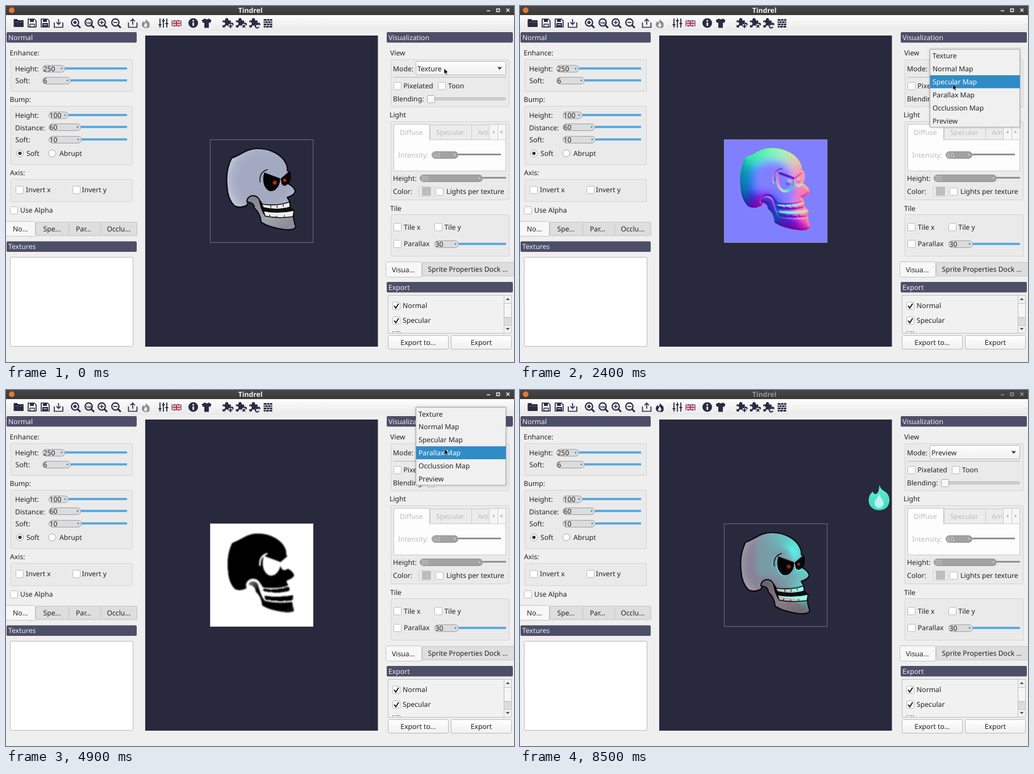
An HTML page with a canvas for the animation above (9000 ms loop, 894x627 px).

```html
<!DOCTYPE html>
<html lang="en">
<head>
<meta charset="utf-8">
<title>Map viewer</title>
<style>
  html, body { margin: 0; width: 894px; height: 627px; overflow: hidden; background: #efefef; }
  svg, canvas { position: absolute; left: 0; top: 0; display: block; }
  canvas { left: 359px; top: 235px; }
  text { font: 12.2px 'Noto Sans', sans-serif; text-rendering: geometricPrecision; white-space: pre; }
  .bold { font-weight: 700; }
</style>
</head>
<body>
<svg id="ui" width="894" height="627" viewBox="0 0 894 627"></svg>
<canvas id="sprite" width="182" height="182"></canvas>
<script>
const INK = '#2a2a44', TEXT = '#222', OFF = '#bcbcbc', BLUE = '#5aaae0';
const MODES = ['Texture', 'Normal Map', 'Specular Map', 'Parallax Map', 'Occlussion Map', 'Preview'];
const ROW = 22.85;

// ---- markup helpers ----
const rect = (x, y, w, h, fill, stroke = 'none', r = 0) =>
  `<rect x="${x + .5}" y="${y + .5}" width="${w - 1}" height="${h - 1}" rx="${r}" fill="${fill}" stroke="${stroke}"/>`;
const fillRect = (x, y, w, h, fill, r = 0) => `<rect x="${x}" y="${y}" width="${w}" height="${h}" rx="${r}" fill="${fill}"/>`;
const text = (x, mid, s, fill = TEXT, extra = '') => `<text x="${x}" y="${mid + 4.2}" fill="${fill}" ${extra}>${s}</text>`;
const path = (d, fill, stroke = 'none', w = 1, extra = '') =>
  `<path d="${d}" fill="${fill}" stroke="${stroke}" stroke-width="${w}" ${extra}/>`;
const dot = (x, y, r, fill, stroke = 'none') => `<circle cx="${x}" cy="${y}" r="${r}" fill="${fill}" stroke="${stroke}"/>`;
const at = (x, y, s, extra = '') => `<g transform="translate(${x} ${y}) ${extra}">${s}</g>`;

const header = (x, y, w, s) => fillRect(x, y, w, 18.4, '#4d4e68', 2) + text(x + 3, y + 9.5, s, '#f0f0f0');
const group = (x, y, w, h) => rect(x, y, w, h, '#eaeaea', '#d3d3d3', 1);
const check = (x, y, on) => rect(x, y, 14, 14, '#fff', '#b9b9b9', 1) +
  (on ? path(`M${x + 3} ${y + 7}l3 4 5-8`, 'none', '#1c1c1c', 2) : '');
const option = (x, mid, tx, s, on) => check(x, mid - 7, on) + text(tx, mid, s);
const radio = (x, y, on) => dot(x, y, 6.2, '#fff', '#a5a5a5') + (on ? dot(x, y, 3, '#333') : '');
const slider = (x, y, end, stop, value, live = true) =>
  fillRect(end, y - 2, stop - end, live ? 4 : 3, live ? BLUE : '#909090') +
  rect(x, y - 6, end - x, 13, live ? '#dcdcdc' : '#a2a2a2', live ? '#9c9c9c' : '#8f8f8f', 6) +
  text(x + 1.5, y + 1, value, live ? TEXT : '#c6c6c6') + dot(end - 6, y, 1.5, live ? '#3a8fd0' : '#d0d0d0');
const tab = (x, y, w, h, tx, mid, s, on) =>
  rect(x, y, w, h, on ? '#f7f7f7' : '#dedede', '#c4c4c4', 1) + text(tx, mid, s);
const button = (x, y, w, h, s) => rect(x, y, w, h, 'url(#raised)', '#b8b8b8', 2) +
  text(x + w / 2, y + h / 2, s, TEXT, 'text-anchor="middle"');

// ---- icons ----
const floppy = full => path('M1 1h11l3 3v11H1z', 'none', INK, 1.7) + path('M4 1h7v5H4z', INK) +
  (full ? path('M3 8h10v7H3z', INK) + path('M5 11h6', 'none', '#eee', 1.2) : path('M4 10h8v5H4z', 'none', INK, 1.3));
const lens = mark => path('M4.5 4.5L9.5 9.5', 'none', INK, 3) + `<circle r="6.3" fill="#f4f4f4" stroke="${INK}" stroke-width="2.2"/>` + mark;
const tray = arrow => path('M1 7v8.5h15V7', 'none', INK, 1.7) + path(arrow, 'none', INK, 1.7);
const puzzle = (x, mark) => at(x, 30, path('M-7-4h4a2.7 2.7 0 1 1 5 0h4v4a2.6 2.6 0 1 1 0 4v3h-4a2.6 2.6 0 1 0-5 0h-4v-4a2.5 2.5 0 1 0 0-4z', INK) +
  dot(5.5, 5, 3.6, '#eee') + path(mark, 'none', INK, 1.8), 'scale(1.12)');
const FLAME = 'M633 167C633 174 640 177 645 181C653 189 651 203 644 208C637 213 627 213 620 208C612 202 612 190 617 183C618 181 620 180 621 179C622 182 624 184 627 183C633 179 631 173 633 167Z';
const DROP = 'M632 183C635 191 640 194 640 200A8 8 0 0 1 624 200C624 194 629 191 632 183Z';

const toolbar = () => [
  path('M13.500 24q0-1 1-1h5l2 2h8.500q1 0 1 1v10q0 1-1 1H14.500q-1 0-1-1z', INK) + path('M16 28.500h15', 'none', '#6d6d80', .7),
  at(38, 22, floppy(false)), at(61, 22, floppy(true)),
  at(84, 22, tray('M8.5 1v9M4.5 6.5l4 4 4-4')),
  at(121.5, 29, lens(path('M-3 0h6M0-3v6', 'none', INK, 2.6))),
  at(145.5, 29, lens(`<text x="-5" y="2.6" fill="${INK}" style="font-size:6px;font-weight:700">100</text>`)),
  at(168.5, 29, lens(path('M-3.5 0h7M0-3.5v7', 'none', INK, 1.7))),
  at(192.5, 29, lens(path('M-3.5 0h7', 'none', INK, 1.7))),
  at(214.5, 22, tray('M8.5 11V1M4.5 5l4-4 4 4')),
  `<g id="lamp">${path(FLAME, 'currentColor', 'none', 1, 'transform="translate(9 -37.5) scale(.375 .36)"')}` +
    `${path(DROP, '#eee', 'none', 1, 'transform="translate(9 -37.5) scale(.375 .36)"')}` +
    `${path('M247 36h6M250 33v6', 'none', 'currentColor', 1.6)}</g>`,
  path('M271 22v16M277 22v16M283 22v16M268.500 33h5M274.500 26h5M280.500 31h5', 'none', INK, 1.8),
  fillRect(291, 25, 18, 11, '#2b3c80') + path('M291 25l18 11M309 25l-18 11', 'none', '#fff', 2.4) +
    path('M291 25l18 11M309 25l-18 11', 'none', '#c8213a', .9) + path('M300 25v11M291 30.500h18', 'none', '#fff', 4) +
    path('M300 25v11M291 30.500h18', 'none', '#c8213a', 2.2),
  dot(329.5, 30, 8.5, INK) + fillRect(328.3, 29, 2.6, 6, '#fff') + dot(329.6, 26, 1.6, '#fff'),
  path('M350 22q3.500 3 7 0l4.500 3-2 5-2.500-1v9.500h-8V29l-2.500 1-2-5z', INK),
  puzzle(389, 'M2.5 5h6M5.5 2v6'), puzzle(412.5, 'M3.5 3l4 4M7.5 3l-4 4'), puzzle(436, 'M7.5 3a2.8 2.8 0 1 0 .5 3'),
  fillRect(453.5, 23, 15, 15, INK) + path('M453 26.500h16M453 30.500h16M453 34.500h16M459 23v3M464 23v3M456 27v3M461 27v3M466 27v3M459 31v3M464 31v3M457 35v3M463 35v3', 'none', '#eee', 1),
  ...[8, 262, 316, 380].map(x => path(`M${x} 23v14`, 'none', '#d4d4d4', 1, 'stroke-dasharray="1 2"'))
].join('');

const leftPanel = () => [
  header(1, 46, 229, 'Normal'),
  text(6.5, 83, 'Enhance:'), group(8, 94, 215, 57),
  text(16, 111, 'Height:'), slider(64, 110, 104, 213, '250'),
  text(16.5, 132, 'Soft:'), slider(64, 131, 114, 213, '6'),
  text(6.5, 165, 'Bump:'), group(8, 176, 215, 104),
  text(16, 193, 'Height:'), slider(75, 192, 110, 213, '100'),
  text(16, 214.5, 'Distance:'), slider(75, 213, 132, 213, '60'),
  text(16.5, 236, 'Soft:'), slider(75, 235, 133, 213, '10'),
  radio(24.5, 259.5, true), text(36, 260, 'Soft'), radio(81.5, 259.5), text(94, 260, 'Abrupt'),
  text(7, 294, 'Axis:'), group(8, 305, 215, 40),
  option(17, 324, 35, 'Invert x'), option(117, 324, 133.5, 'Invert y'), option(7, 360, 25, 'Use Alpha'),
  tab(52, 380, 59, 25, 65.5, 392.5, 'Spe...'), tab(110, 380, 57, 25, 123, 392.5, 'Par...'),
  tab(166, 380, 65, 25, 177.5, 392.5, 'Occlu...'), tab(-1, 379, 53, 27, 12, 393, 'No...', true),
  header(1, 414.5, 229, 'Textures'), rect(7, 442, 217, 158, '#fff', '#b9b9b9', 1)
].join('');

const rightPanel = () => [
  header(670, 46, 222, 'Visualization'),
  text(676, 83, 'View'), group(677, 94, 209, 84), text(681, 110.5, 'Mode:'),
  rect(721, 97, 159, 25, 'url(#raised)', '#b5b5b5', 2),
  `<text id="mode" x="724" y="114.700" fill="${TEXT}"></text>`,
  path('M864.500 107.500h8.500l-4.200 5z', '#4a4a4a'), path('M682 125.500h198', 'none', '#b4b4b4'),
  option(682, 141, 699.5, 'Pixelated'), option(760, 141, 778, 'Toon'),
  text(681, 164, 'Blending:'), rect(750, 161, 130, 5, '#d4d4d4', '#b2b2b2', 2), rect(741, 157, 14, 14, '#f8f8f8', '#a9a9a9', 2),
  text(675, 192, 'Light'), group(677, 203, 209, 139),
  rect(746, 209, 74, 27, '#ececec', '#cbcbcb'), rect(819, 209, 32, 27, '#ececec', '#cbcbcb'),
  rect(682, 235, 198, 56, '#fdfdfd', '#c6c6c6'), rect(682, 208, 64, 28, '#fdfdfd', '#c6c6c6'), fillRect(683, 234, 62, 3, '#fdfdfd'),
  rect(850, 208, 16, 28, '#f6f6f6', '#c9c9c9'), rect(865, 208, 15, 28, '#f6f6f6', '#c9c9c9'),
  path('M859.500 219v6l-4-3z', OFF), path('M870.500 219v6l4-3z', OFF),
  text(693, 222.5, 'Diffuse', OFF), text(757, 223, 'Specular', OFF), text(830, 223, 'Am', OFF),
  text(690, 263, 'Intensity:', OFF), slider(749, 262, 796, 871, '60', false),
  text(681, 304, 'Height:'), slider(728, 303, 839, 880, '30', false),
  text(681, 327, 'Color:'), rect(727, 318, 26, 18, '#ececec', '#cfcfcf', 1), fillRect(732, 319, 16, 15, '#bdbdbd'),
  option(756, 327, 775, 'Lights per texture'),
  text(676, 357, 'Tile'), group(677, 367, 209, 74),
  option(682, 389.5, 700, 'Tile x'), option(754, 389.5, 771.5, 'Tile y'),
  option(682, 419, 700, 'Parallax'), slider(754, 419, 797, 880, '30'),
  tab(732, 451, 163, 25, 742.5, 464, 'Sprite Properties Dock ...'), tab(668, 450, 64, 28, 679, 464.5, 'Visua...', true),
  header(670, 486, 222, 'Export'), rect(672, 509, 218, 68, '#f1f1f1', '#bcbcbc'),
  option(680, 528, 698, 'Normal', true), option(680, 554, 698, 'Specular', true),
  path('M680.500 576v-2.500h13v2.500M688 576l2.500-3', '#fff', '#999'),
  rect(876, 509, 14, 68, '#dcdcdc', '#c0c0c0'), rect(876, 523, 14, 26, '#f6f6f6', '#b9b9b9', 1),
  rect(876, 509, 14, 15, '#f2f2f2', '#c0c0c0'), rect(876, 562, 14, 15, '#f2f2f2', '#c0c0c0'),
  path('M879.500 518h7l-3.500-4z', '#555'), path('M879.500 567h7l-3.500 4z', '#555'),
  button(672, 580, 107, 25, 'Export to...'), button(783, 580, 107, 25, 'Export')
].join('');

const $ = id => document.getElementById(id);
$('ui').innerHTML = `
  <defs>
    <linearGradient id="raised" x2="0" y2="1"><stop stop-color="#fff"/><stop offset="1" stop-color="#f0f0f0"/></linearGradient>
    <linearGradient id="bar" x2="0" y2="1"><stop stop-color="#fdfdfd"/><stop offset="1" stop-color="#e9e9e9"/></linearGradient>
    <linearGradient id="dark" x2="0" y2="1"><stop stop-color="#474747"/><stop offset="1" stop-color="#393939"/></linearGradient>
    <linearGradient id="glow" x2="0" y2="1"><stop stop-color="#5df0d2"/><stop offset="1" stop-color="#45d9bd"/></linearGradient>
    <filter id="shade" x="-10%" y="-10%" width="120%" height="120%"><feDropShadow dx="0" dy="0" stdDeviation="2" flood-opacity=".25"/></filter>
  </defs>
  ${fillRect(0, 0, 894, 627, '#efefef')}${fillRect(0, 0, 894, 16, 'url(#dark)')}${fillRect(0, 16, 894, 28, 'url(#bar)')}
  ${dot(10, 7.5, 5, '#e9782c')}
  <g id="title">${text(430, 7.5, 'Tindrel', 'currentColor', 'class="bold" text-anchor="middle"')}
    ${path('M846 8.500h6M863.500 5h5v5h-5zM880.500 4.500l5.500 5.500M886 4.500l-5.500 5.500', 'none', 'currentColor', 1.5)}</g>
  ${toolbar()}${leftPanel()}
  ${fillRect(245, 52, 409.5, 548, '#28293d')}
  ${rightPanel()}
  ${[235, 666].map(x => path(`M${x} 323v9`, 'none', '#d0d0d0', 1, 'stroke-dasharray="1 2"')).join('')}
  <g id="light">${path(FLAME, 'url(#glow)')}${path(DROP, '#b9f4f1')}</g>
  <g id="popup"><g filter="url(#shade)">${rect(721, 0, 159, 138, '#f0f0f0', '#a8a8a8')}</g>
    <rect id="hot" x="721.500" width="158.500" height="${ROW}" fill="#308cc6"/>
    ${MODES.map((m, i) => text(726, 12.4 + ROW * i, m, TEXT, 'class="item"')).join('')}</g>
  <g id="cursor">${path('M0 0V9.500L2.200 7.600 3.800 11 5.400 10.300 3.900 7H7Z', '#000', '#fff', .5)}</g>
  <g id="resize">${path('M228 82.500l3-2.500v5zM239 82.500l-3-2.500v5zM230 82h7v1h-7z', '#000')}</g>`;
const items = [...document.querySelectorAll('.item')];

// ---- sprite ----
const SIZE = 182, OX = 359, OY = 235;
const layer = paint => {
  const c = document.createElement('canvas');
  c.width = c.height = SIZE;
  paint(c.getContext('2d', { willReadFrequently: true }));
  return c;
};
const filtered = (src, bg, filter = 'none') => layer(g => {
  g.fillStyle = bg;
  g.fillRect(0, 0, SIZE, SIZE);
  g.filter = filter;
  g.drawImage(src, 0, 0);
});
const read = c => c.getContext('2d').getImageData(0, 0, SIZE, SIZE).data;

const skull = layer(g => {
  g.translate(-OX, -OY);
  g.lineJoin = g.lineCap = 'round';
  const shape = (d, fill, stroke = '#0a0a0e', w = 2.2) => {
    const p = new Path2D(d);
    if (fill) { g.fillStyle = fill; g.fill(p); }
    if (stroke) { g.strokeStyle = stroke; g.lineWidth = w; g.stroke(p); }
  };
  const pupil = (x, y, r) => {
    const p = g.createRadialGradient(x, y, 0, x, y, r);
    p.addColorStop(0, '#e23a1c'); p.addColorStop(.45, '#b0240f'); p.addColorStop(1, '#30080400');
    g.fillStyle = p;
    g.beginPath(); g.arc(x, y, r, 0, 7); g.fill();
  };
  const bone = g.createRadialGradient(453, 306, 42, 453, 306, 68);
  bone.addColorStop(0, '#a2a9c1'); bone.addColorStop(.5, '#abb1c7'); bone.addColorStop(1, '#c6cbdb');
  const jaw = g.createLinearGradient(440, 335, 480, 396);
  jaw.addColorStop(0, '#80838e'); jaw.addColorStop(.6, '#a2a5ae'); jaw.addColorStop(1, '#8b8e98');

  shape('M444 338L499 345 500 354 507 361 480 371 453 366Z', '#0d0d12');
  shape('M397 268C412 263 424 251 442 251C466 251 486 262 493 278Q496 285 495 290L499 292Q503 303 497 313Q508 319 509 327Q506 334 495 337L500 346Q480 354 451 350Q443 332 429 339L424 351Q412 357 402 352Q390 340 389 318Q386 290 397 268Z', bone);
  shape('M424 343Q426 334 436 334Q446 336 447 346Q449 356 454 366Q480 374 506 370Q506 377 510 389Q507 395 492 394Q465 391 449 381Q448 365 437 356Q437 346 424 345Z', jaw);
  shape('M450 349Q478 353 499 345L500 354Q478 361 453 355Z', '#eeeeec', '#0a0a0e', 1.6);
  shape('M453 361Q480 366 507 360L505 371Q480 375 456 370Z', '#eeeeec', '#0a0a0e', 1.6);
  shape('M466 352v3M477 352v3M488 350v3M464 368v2M476 370v2M490 369v2', null, '#222', 1.4);
  shape('M455 294L482 304Q482 317 473 324Q461 330 455 316Q451 304 455 294Z', '#050508', '#050508', 1);
  shape('M484 304L499 291Q502 304 496 313Q490 319 486 314Z', '#050508', '#050508', 1);
  shape('M447 310Q445 293 460 288', null, '#15151c', 1.5);
  pupil(473, 311, 5.5);
  pupil(490.5, 307, 4.5);
});

const solid = filtered(skull, '#000');
const mask = layer(g => {
  g.drawImage(skull, 0, 0);
  g.globalCompositeOperation = 'source-in';
  g.fillStyle = '#fff';
  g.fillRect(0, 0, SIZE, SIZE);
});
const tex = read(skull);
const dome = read(filtered(mask, '#000', 'blur(13px)'));
const relief = read(filtered(solid, '#000', 'grayscale(1) blur(1.3px)'));
const slope = (map, i, step, reach) => (map[i - step * reach] - map[i + step * reach]) / (510 * reach);

const unit = v => { const n = Math.hypot(...v); return v.map(a => a / n); };
const dotp = (a, b) => a[0] * b[0] + a[1] * b[1] + a[2] * b[2];
const normalAt = (i, depth) =>
  unit([4, 4 * SIZE].map(s => depth * (slope(dome, i, s, 4) * 75 + slope(relief, i, s, 1) * 10)).concat(1));
const shadeEach = (depth, color) => layer(g => {
  const img = g.createImageData(SIZE, SIZE);
  for (let i = 0; i < tex.length; i += 4) {
    if (tex[i + 3] > 20) img.data.set([...color(normalAt(i, depth), i), tex[i + 3]], i);
  }
  g.putImageData(img, 0, 0);
});

const normalMap = shadeEach(1, n => [128 + 127 * n[0], 128 - 127 * n[1], 128 + 127 * n[2]]);
const lit = shadeEach(.5, (n, i) => {
  const p = i / 4, l = unit([632 - OX - p % SIZE, 190 - OY - Math.floor(p / SIZE), 75]);
  const d = Math.max(0, dotp(n, l));
  const shine = .4 * Math.max(0, dotp(n, unit([l[0], l[1], l[2] + 1]))) ** 26;
  const ambient = [.83, .76, .77], lamp = [.55, 1.28, 1.08];
  return ambient.map((a, k) => tex[i + k] * (a + (lamp[k] - a) * d + shine * [0, .5, .4][k]));
});
const occlusion = filtered(solid, '#000', 'grayscale(1) blur(1.2px) brightness(5) blur(1.5px)');
const views = [
  skull,
  filtered(normalMap, '#8080ff'),
  filtered(solid, '#000', 'grayscale(1) blur(1.4px)'),
  filtered(solid, '#fff', 'grayscale(1) blur(1.2px) contrast(8) invert(1) blur(1.2px)'),
  layer(g => {
    g.drawImage(occlusion, 0, 0);
    g.globalCompositeOperation = 'lighten';
    g.fillStyle = '#111';
    g.fillRect(0, 0, SIZE, SIZE);
  }),
  lit
];

// ---- timeline ----
const LOOP = 9000;
const OPEN = [400, 1700, 3500, 4800, 6100];
const PICK = [1000, 2700, 4200, 5500, 6800];
const TRACK = [
  [0, 771, 110], [500, 771, 110], [800, 764, 136], [1000, 764, 136], [1600, 759, 112], [1700, 759, 112],
  [2000, 761, 135], [2100, 761, 147], [2200, 762, 150], [2300, 762, 150], [2400, 762, 138], [2700, 762, 138],
  [3200, 766, 111], [3500, 766, 111], [3900, 772, 138], [4200, 772, 138], [4700, 772, 104], [4900, 772, 104],
  [5100, 776, 127], [5300, 773, 134], [5500, 773, 134], [6000, 772, 101], [6200, 772, 101], [6500, 771, 137],
  [7200, 771, 137], [7400, 771, 133], [7700, 771, 133], [7800, 480, 110], [8100, 180, 56], [9000, 180, 56]
];
const pointer = t => {
  const k = TRACK.findIndex(p => p[0] > t), [t0, x0, y0] = TRACK[k - 1], [t1, x1, y1] = TRACK[k];
  const f = (t - t0) / (t1 - t0);
  return [x0 + (x1 - x0) * f, y0 + (y1 - y0) * f];
};
const show = (id, on) => $(id).setAttribute('visibility', on ? 'visible' : 'hidden');

const brush = $('sprite').getContext('2d');
let last = -1;
function draw(t) {
  const mode = PICK.filter(p => p <= t).length;
  const open = OPEN.filter(p => p <= t).length > mode;
  const [x, y] = pointer(t);
  const top = 98.6 - ROW * mode, hot = Math.floor((y - top) / ROW);
  const resizing = t >= 7900 && t < 8100;

  $('mode').textContent = MODES[mode];
  $('popup').setAttribute('transform', `translate(0 ${top})`);
  show('popup', open);
  $('hot').setAttribute('y', .5 + ROW * hot);
  items.forEach((el, i) => el.setAttribute('fill', i === hot ? '#fff' : TEXT));
  $('cursor').setAttribute('transform', `translate(${x} ${y})`);
  show('cursor', t < 8200 && !resizing);
  show('resize', resizing);
  show('light', mode === 5);
  $('lamp').setAttribute('color', mode === 5 ? INK : '#8d8d8d');
  $('title').setAttribute('color', t < 8500 ? '#f4f4f4' : '#989898');

  brush.clearRect(0, 0, SIZE, SIZE);
  brush.drawImage(views[mode], 0, 0);
  brush.strokeStyle = 'rgba(160, 160, 165, .6)';
  brush.strokeRect(.5, .5, SIZE - 1, SIZE - 1);
}
function tick() {
  const t = Math.floor(performance.now() % LOOP / 100) * 100;
  if (t !== last) draw(last = t);
  requestAnimationFrame(tick);
}
tick();
</script>
</body>
</html>
```
